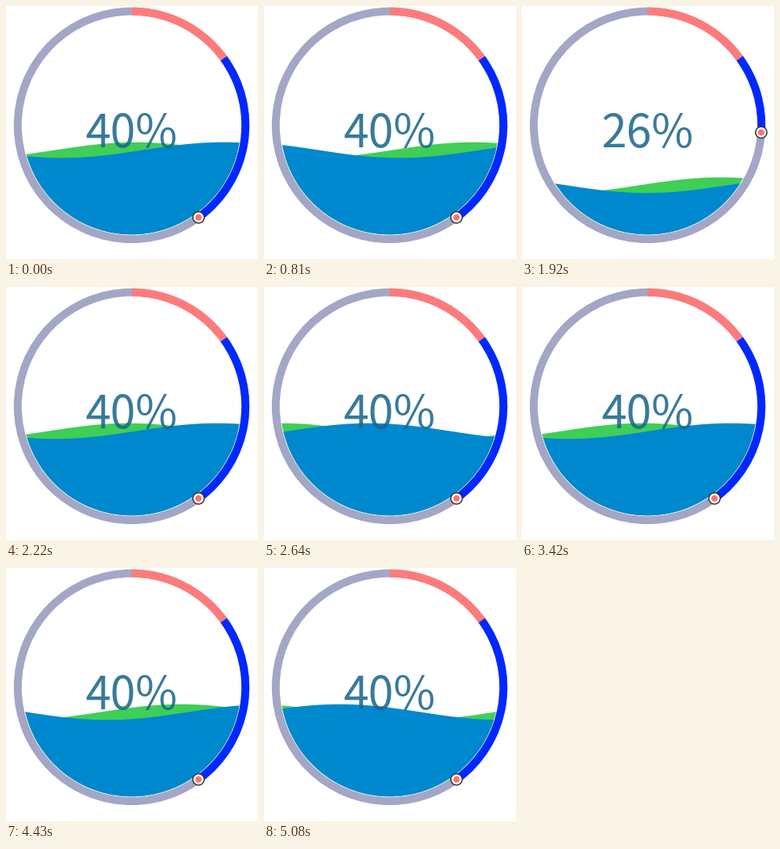
These frames come from a looping animation (316 px wide and 317 px high, 5.18 s). A matplotlib script:

```python
import numpy as np
import matplotlib.pyplot as plt
from matplotlib.animation import FuncAnimation
from matplotlib.patches import Circle, Polygon, Wedge

W, H, DPI = 316, 317, 100
LOOP, TICK = 5180, 20
CX, CY = 157.5, 149.4
R_OUT, R_IN, R_WATER = 147.7, 137.8, 136.9
AMP, K, LAG = 9.8, 0.0155, 110
TARGET, RED_SHARE = 40, 15

# The picture advances in steps slightly under 60 ms.
STEP_T, STEP_N = [0, 1210, 3840, 5080], [0, 21, 65, 86]
# Position of the front wave's trough as it drifts left.
DRIFT_T = [0, 810, 1920, 2640, 3420, 4430, 5080]
DRIFT_X = [70, -237, -652, -880, -1157, -1515, -1729]

fig = plt.figure(figsize=(W / DPI, H / DPI), dpi=DPI, facecolor="white")
ax = fig.add_axes([0, 0, 1, 1])
ax.set(xlim=(0, W), ylim=(H, 0))
ax.axis("off")


def px(n):
    return n * 72 / DPI


def ring(color, start, end, z):
    return ax.add_patch(Wedge((CX, CY), R_OUT, start, end, width=R_OUT - R_IN,
                              fc=color, lw=0, zorder=z))


def water(color, z):
    return ax.add_patch(Polygon([[0, 0], [1, 0], [0, 1]], fc=color, lw=0, zorder=z))


track = ring("#a3a6c5", 0, 360, 1)
blue_arc = ring("#0028ff", -90, 0, 2)
red_arc = ring("#ff7b7b", -90, 0, 2)
back = water("#3fce56", 3)
front = water("#0088ce", 4)
label = ax.text(157.4, 177.5, "", color=(0.10, 0.40, 0.55), alpha=0.87, zorder=5,
                family="Noto Sans CJK JP", size=px(57),
                ha="center", va="baseline")
knob = [ax.add_patch(Circle((0, 0), 7.1, fc="white", ec="#33343f", lw=px(1.5), zorder=6)),
        ax.add_patch(Circle((0, 0), 4, fc="#ff7268", lw=0, zorder=7))]

xs = CX + R_WATER * np.sin(np.linspace(-np.pi / 2, np.pi / 2, 240))
half = np.sqrt(np.maximum(R_WATER ** 2 - (xs - CX) ** 2, 0))


def fill(shape, level, trough):
    low = CY + half
    top = np.clip(level + AMP * np.cos(K * (xs - trough)), CY - half, low)
    shape.set_xy(np.column_stack([np.r_[xs, xs[::-1]], np.r_[top, low[::-1]]]))


def percent(step):
    if step < 28:
        return TARGET
    return min(TARGET, max(0, round(26 + 4.9 * (step - 33)))) if step > 28 else 0


def update(i):
    step = int(np.interp(i * TICK, STEP_T, STEP_N) + 0.15)
    t = np.interp(step, STEP_N, STEP_T)
    p = percent(step)

    trough = np.interp(t, DRIFT_T, DRIFT_X)
    level = 306.2 - 3.142 * p
    fill(front, level, trough)
    fill(back, level, trough - LAG)
    label.set_text(f"{p}%")

    split = -90 + 3.6 * min(p, RED_SHARE)
    end = -90 + 3.6 * p
    red_arc.set_theta2(split)
    blue_arc.set_theta1(split)
    blue_arc.set_theta2(end)
    red_arc.set_visible(p > 0)
    blue_arc.set_visible(p > RED_SHARE)

    a, r = np.radians(end), (R_OUT + R_IN) / 2
    for dot in knob:
        dot.set_center((CX + r * np.cos(a), CY + r * np.sin(a)))
        dot.set_visible(p > 0)
    return [track, blue_arc, red_arc, back, front, label, *knob]


anim = FuncAnimation(fig, update, frames=LOOP // TICK, interval=TICK,
                     repeat=True, repeat_delay=0, blit=False)
plt.show()
```
